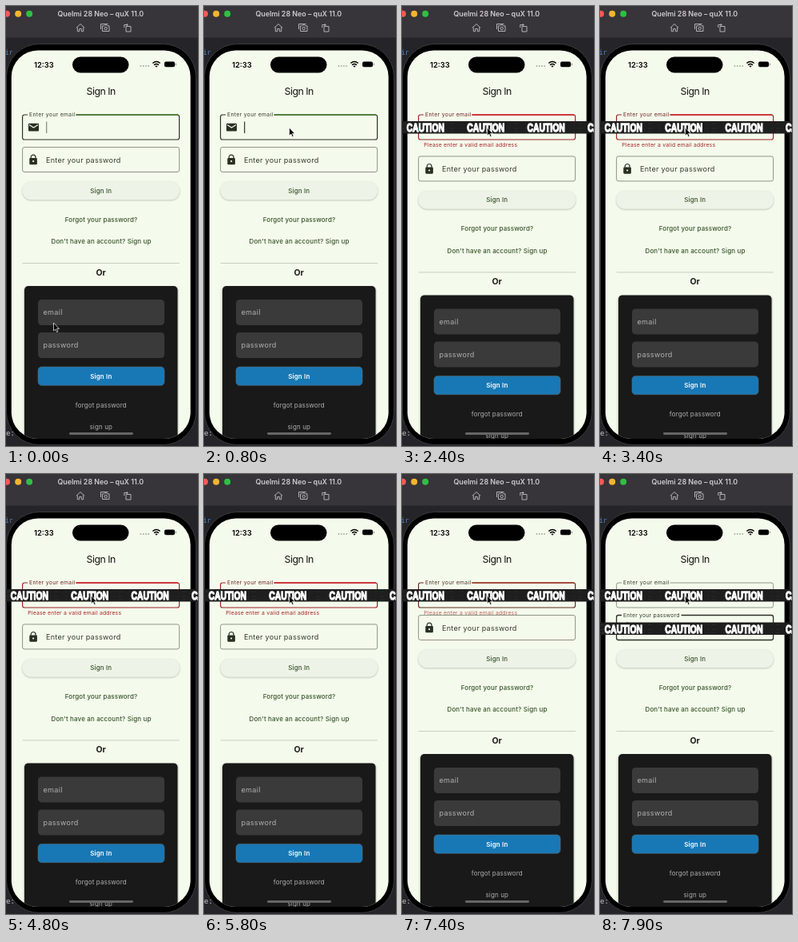
Write an HTML page that moves like this. It is 240 px wide and 550 px high and loops after 8000 ms.

```html
<!DOCTYPE html>
<html lang="en">
<head>
<meta charset="utf-8">
<title>Sign In</title>
<style>
html, body { margin: 0; width: 100%; height: 100%; overflow: hidden; background: #252428; }
svg { display: block; width: 240px; height: 550px; }
text { font-family: Inter, Roboto, sans-serif; white-space: pre; }
.body { font-size: 9.07px; letter-spacing: .28px; }
.link { font-size: 7.95px; font-weight: 500; letter-spacing: .17px; text-anchor: middle; }
.mid { text-anchor: middle; }
.tape text { font: bold 15px "Liberation Sans", Arial, sans-serif; fill: #fff; stroke: #fff; stroke-width: 1.4px; }
</style>
</head>
<body>
<svg viewBox="0 0 240 550">
  <defs>
    <clipPath id="screen"><rect x="6.800" y="55.500" width="223.800" height="485.500" rx="33"/></clipPath>
    <filter id="soft" x="-10%" y="-30%" width="120%" height="160%"><feGaussianBlur stdDeviation="1"/></filter>
    <g id="tape" class="tape">
      <rect width="240" height="15.500" fill="#1e1e1e"/>
      <path d="M0 3H240M0 9H240M0 13H240" stroke="#2b2b2b" stroke-width=".8" stroke-dasharray="5 9 2 4"/>
      <g id="words"></g>
    </g>
  </defs>

  <!-- desktop and window bar -->
  <rect width="240" height="550" fill="#252428"/>
  <text x="-1" y="61" font-size="8" fill="#5486c4" style="font-family:'DejaVu Sans Mono',monospace">ir</text>
  <text x="0" y="537" font-size="9" fill="#c9c6cf" style="font-family:'DejaVu Sans Mono',monospace">e:</text>
  <rect width="240" height="39.500" fill="#37343a"/>
  <circle cx="1" cy="9.800" r="4" fill="#f85a52"/>
  <circle cx="15.200" cy="9.800" r="4" fill="#f3b52e"/>
  <circle cx="29.200" cy="9.800" r="4" fill="#2fbf45"/>
  <text class="mid" x="118.300" y="12.800" font-size="8.900" font-weight="600" fill="#cfccd1">Quelmi 28 Neo – quX 11.0</text>
  <g fill="none" stroke="#b3b0b6" stroke-width="1" stroke-linejoin="round">
    <path d="M87.800 27.300L93 22.500L98.200 27.300M89.300 26.500V31.700H91.700V28.500H94.300V31.700H96.700V26.500"/>
    <path d="M118.500 29V22.500H127.500M120.500 24.800H122.500L123.300 23.800H126L126.800 24.800H129V31.500H120.500Z"/>
    <circle cx="124.700" cy="28" r="1.700"/>
    <path d="M150 25.500H156V32H150ZM147.800 27V23.500H152M150.700 22L152.200 23.500L150.700 25"/>
  </g>

  <!-- phone body -->
  <rect x=".5" y="47.500" width="237" height="501" rx="41" fill="#000" stroke="#3b3a3e"/>

  <g clip-path="url(#screen)">
    <rect x="6" y="54" width="226" height="488" fill="#f4fbec"/>
    <rect x="83" y="63.500" width="70.500" height="20" rx="10" fill="#000"/>
    <text x="35" y="76.500" font-size="9.400" font-weight="600">12:33</text>
    <g fill="#a4aa9f">
      <circle cx="168.500" cy="75" r=".9"/><circle cx="171.700" cy="75" r=".9"/>
      <circle cx="174.900" cy="75" r=".9"/><circle cx="178.100" cy="75" r=".9"/>
    </g>
    <path d="M183.300 71.500Q188 67.500 192.700 71.500M185 73.700Q188 71.200 191 73.700" fill="none" stroke="#000" stroke-width="1.400"/>
    <path d="M186.300 75.100Q188 73.900 189.700 75.100L188 76.800Z"/>
    <rect x="198" y="69.500" width="13" height="6.800" rx="2" fill="#000"/>
    <rect x="211.700" y="71.600" width="1" height="2.600" rx=".5" fill="#777"/>
    <text class="mid" x="118.700" y="110.500" font-size="12.300" letter-spacing="-.5" fill="#12150f">Sign In</text>

    <!-- email field -->
    <path id="mailBox" fill="none"/>
    <path id="mailTop" fill="none" d="M87.500 136H215"/>
    <text id="mailLabel" x="29" y="138.400" font-size="6.850" letter-spacing=".32">Enter your email</text>
    <path d="M29 146.800H40Q41 146.800 41 147.800V155.500Q41 156.500 40 156.500H29Q28 156.500 28 155.500V147.800Q28 146.800 29 146.800Z" fill="#283022"/>
    <path d="M29 148.500L34.500 152L40 148.500" fill="none" stroke="#f4fbec" stroke-width="1.100"/>
    <text id="mail" class="body" x="50" y="154.600" fill="#191d17"></text>
    <rect id="caret" y="144.500" width="1.300" height="14.500"/>
    <text id="error" x="27.200" font-size="6.800" letter-spacing=".23" fill="#a82026">Please enter a valid email address</text>

    <g id="rest">
      <path id="passBox" fill="none"/>
      <path d="M31.200 190.500V189A2.900 2.900 0 0 1 37 189V190.500" fill="none" stroke="#283022" stroke-width="1.200"/>
      <rect x="29.300" y="190" width="9.600" height="8.300" rx="1.100" fill="#283022"/>
      <circle cx="34.100" cy="194.100" r="1.100" fill="#f4fbec"/>
      <text id="passLabel" class="body" fill="#343b2f"/>

      <rect x="20.500" y="220.600" width="196.500" height="22.500" rx="11.250" fill="#8d9486" opacity=".6" filter="url(#soft)"/>
      <rect x="20.500" y="219.800" width="196.500" height="22.500" rx="11.250" fill="#eef3e8"/>
      <g fill="#365128">
        <text class="link" x="118.800" y="233.700">Sign In</text>
        <text class="link" x="119" y="270">Forgot your password?</text>
        <text class="link" x="119" y="297.200">Don't have an account? Sign up</text>
      </g>
      <path d="M20.500 321.500H217" stroke="#c4cabd" stroke-width=".9"/>
      <text class="mid" x="118.700" y="337" font-size="10.500" font-weight="700" fill="#191d17">Or</text>

      <rect x="22.500" y="351" width="192.500" height="215" rx="5" fill="#555b50" opacity=".45" filter="url(#soft)"/>
      <rect x="23" y="350" width="191.500" height="215" rx="5" fill="#191919"/>
      <g fill="#3a3a3a">
        <rect x="40" y="367" width="158" height="32" rx="4.500"/>
        <rect x="40" y="408" width="158" height="32" rx="4.500"/>
      </g>
      <text class="body" x="46.500" y="386.200" fill="#b0b0b0">email</text>
      <text class="body" x="46.500" y="427.200" fill="#b0b0b0">password</text>
      <rect x="40" y="451" width="158" height="23.300" rx="4.500" fill="#1878b5" stroke="#5b6870" stroke-width=".6"/>
      <text class="link" x="118.800" y="465.600" style="font-weight:600" fill="#fff">Sign In</text>
      <g fill="#b0b0b0" font-size="7.950" letter-spacing=".17">
        <text class="mid" x="118.800" y="501.800">forgot password</text>
        <text class="mid" x="118.800" y="529">sign up</text>
      </g>
    </g>
    <rect x="79" y="533" width="80" height="2.900" rx="1.450" fill="#666"/>
  </g>

  <use id="tape1" href="#tape" y="144"/>
  <use id="tape2" href="#tape" y="185.500"/>
  <path id="pointer" d="M0 0V10L2.300 8L3.900 11.500L5.500 10.800L4 7.400H7Z" fill="#000" stroke="#fff" stroke-width=".7"/>
</svg>
<script>
const LOOP = 8000, STEP = 100;
const ERROR_ON = 1640, ERROR_OFF = 7350, FOCUS_PASS = 7560, FADE = 167;
const TAPE1_ON = 2000, TAPE2_ON = 7800, TYPE_ON = 1500, ROW_SHIFT = 11.4;
const INK = [52, 62, 45], DARK = [42, 48, 38], GREEN = [65, 122, 34], GREY = [116, 123, 109];
const RED = [206, 28, 36], DEEP_RED = [158, 32, 36], LABEL_RED = [112, 34, 32];

const $ = id => document.getElementById(id);
const set = (id, attrs) => { for (const k in attrs) $(id).setAttribute(k, attrs[k]); };
const clamp = v => Math.max(0, Math.min(1, v));
const ease = v => v * v * (3 - 2 * v);
const lerp = (a, b, k) => a + (b - a) * k;
const ramp = (t, start, span) => clamp((t - start) / span);
const mix = (a, b, k) => a.map((v, i) => lerp(v, b[i], k));
const rgb = c => `rgb(${c.map(Math.round)})`;

// Rounded outline with a notch in the top edge for the label
function outline(top, gapEnd) {
  const l = 20.6, r = 216.6, b = top + 31, q = 2.5;
  return `M${gapEnd} ${top}H${r - q}Q${r} ${top} ${r} ${top + q}V${b - q}Q${r} ${b} ${r - q} ${b}` +
    `H${l + q}Q${l} ${b} ${l} ${b - q}V${top + q}Q${l} ${top} ${l + q} ${top}H27`;
}

$('passLabel').textContent = 'Enter your password';
$('words').innerHTML = [0, 1, 2, 3].map(i =>
  `<text transform="translate(${5.8 + i * 75.4} 13.2) scale(.69 1)">CAUTION</text>`).join('');

function draw(t) {
  const err = ramp(t, ERROR_ON, FADE) * (1 - ramp(t, ERROR_OFF, FADE));
  const swap = ease(ramp(t, FOCUS_PASS, FADE));
  const shift = t >= ERROR_ON && t < ERROR_OFF ? ROW_SHIFT : 0;

  set('mailBox', {
    d: outline(136, 87.5),
    stroke: rgb(mix(mix(DARK, GREY, swap), DEEP_RED, err * err)),
    'stroke-width': lerp(1.15, .8, swap)
  });
  set('mailTop', { stroke: rgb(mix(GREEN, RED, err)), 'stroke-width': 1.5, opacity: 1 - swap });
  set('mailLabel', { fill: rgb(mix(INK, LABEL_RED, err * err)) });
  set('error', { y: lerp(173.5, 176.3, clamp(err * 2.5)), opacity: err });

  const count = t < TYPE_ON ? 0 : Math.min(4, 1 + Math.floor((t - TYPE_ON) / STEP));
  $('mail').textContent = 'info'.slice(0, count);
  const blink = clamp(.5 + .7 * Math.cos((t - 770) / 1000 * 2 * Math.PI));
  set('caret', {
    x: count ? 50.4 + $('mail').getComputedTextLength() : 50,
    fill: t >= ERROR_ON ? '#c41a1e' : '#2c3327',
    opacity: t >= TAPE1_ON ? 0 : count ? 1 : blink * .9
  });

  set('rest', { transform: `translate(0 ${shift})` });
  set('passBox', {
    d: outline(176.5, lerp(27, 101.5, swap)),
    stroke: rgb(mix(GREY, DARK, swap)),
    'stroke-width': lerp(.8, 1.3, swap)
  });
  set('passLabel', {
    transform: `translate(${lerp(50, 29, swap)} ${lerp(195.7, 179.4, swap)}) scale(${lerp(1, .755, swap)})`
  });

  set('tape1', { visibility: t >= TAPE1_ON ? 'visible' : 'hidden' });
  set('tape2', { visibility: t >= TAPE2_ON ? 'visible' : 'hidden' });

  const move = ease(ramp(t, 0, 750));
  set('pointer', { transform: `translate(${lerp(59.5, 106.5, move)} ${lerp(396, 152, move)})` });
}

const begin = performance.now();
function frame() {
  const t = (performance.now() - begin) % LOOP;
  draw(Math.floor(t / STEP) * STEP);
  requestAnimationFrame(frame);
}
draw(0);
requestAnimationFrame(frame);
</script>
</body>
</html>
```
